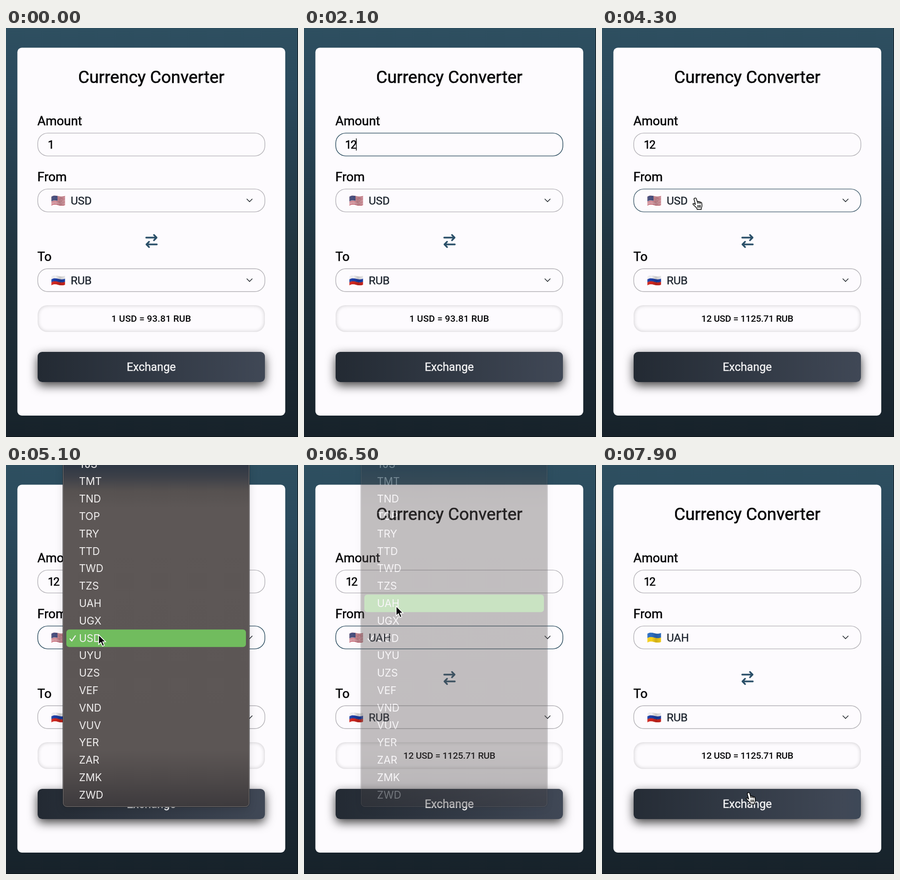
Animation, 600 px wide and 841 px high, one loop 8 s. Source, as an HTML page:

```html
<!DOCTYPE html>
<html lang="en">
<head>
<meta charset="utf-8">
<title>Currency Converter</title>
<style>
html, body { margin: 0; width: 100%; height: 100%; overflow: hidden; background: #17222a; }
#stage { position: relative; width: 600px; height: 841px; overflow: hidden;
  background: linear-gradient(#2e4f60, #2a4a5d 14%, #20343f 55%, #17222a); }
#stage::after { content: ""; position: absolute; inset: 0; border: solid #0c1216; border-width: 0 1px 1px 0; }
#stage div, #stage svg { position: absolute; box-sizing: border-box; }
#stage svg { left: 0; top: 0; width: 600px; height: 841px; overflow: visible; }
.field { fill: none; stroke-width: 1.4px; }
#result { left: 65px; top: 570px; width: 467px; height: 55px; border-radius: 20px;
  box-shadow: inset 0 0 9px rgba(0, 0, 0, .2); }
#button { left: 65px; top: 666px; width: 467px; height: 62px; border-radius: 9px;
  background: linear-gradient(90deg, #232a33, #404856 50%, #1d4c68) 0 0 / 200% 100%;
  box-shadow: 0 7px 20px rgba(0, 0, 0, .75); }
text { font-family: Roboto, "Open Sans", sans-serif; fill: #050507; }
.thick { stroke: #050507; stroke-width: .6px; }
.label { font-size: 26px; }
.value { font-size: 23px; letter-spacing: -1.6px; }
.code { font-size: 22.8px; fill: #1f2630; stroke: #1f2630; stroke-width: .45px; }
#rate { font-size: 19px; font-weight: 500; text-anchor: middle; }
#label { font-size: 23.4px; text-anchor: middle; fill: #f4f4f5; stroke: #f4f4f5; stroke-width: .4px; }
#menu { left: 117px; top: -20px; width: 383px; height: 723px; border-radius: 0 0 8px 8px; overflow: hidden;
  border: 1px solid #787473; box-shadow: 0 0 0 1px rgba(20, 20, 24, .55), 0 6px 18px rgba(0, 0, 0, .12);
  background: linear-gradient(#2d3744 2.5%, #3d4048 6%, #565150 10%, #5d5756 15%, #5c5655 84%, #504b4b 91%, #3d3a3d); }
#menu text { font: 21.3px Inter, sans-serif; fill: #f1efef; }
</style>
</head>
<body>
<div id="stage">
  <svg>
    <rect x="23.4" y="40.5" width="550.4" height="756.4" rx="9" fill="#fdfbfe"/>
    <rect class="field" id="amount" x="65.3" y="216.1" width="466.6" height="47" rx="20.5"/>
    <rect class="field" id="from" x="65.3" y="331.1" width="466.6" height="47" rx="20.5"/>
    <rect class="field" id="to" x="65.3" y="495" width="466.6" height="47" rx="20.5"/>
  </svg>
  <div id="result"></div>
  <div id="button"></div>
  <svg>
    <defs>
      <clipPath id="cloth"><path d="M0 2.6c5-3 9-2.5 14-1s10 1.5 14-.5v18.2c-4 2-9 2-14 .5s-9-2-14 1z"/></clipPath>
      <linearGradient id="fold">
        <stop offset="0" stop-color="#fff" stop-opacity=".08"/>
        <stop offset=".3" stop-opacity="0"/>
        <stop offset=".62" stop-opacity=".17"/>
        <stop offset="1" stop-opacity=".04"/>
      </linearGradient>
    </defs>
    <text class="thick" x="298.5" y="113" font-size="35.2" text-anchor="middle">Currency Converter</text>
    <text class="label thick" x="64.5" y="200">Amount</text>
    <text class="label thick" x="64.5" y="314.5">From</text>
    <text class="label thick" x="64.5" y="478.5">To</text>
    <text class="value thick" id="value" y="247.5"></text>
    <path id="caret" d="M107.5 227v25" stroke="#000" stroke-width="1.4"/>
    <text class="code" id="fromCode" x="133" y="362.5"></text>
    <text class="code" x="133" y="526.5">RUB</text>
    <g id="flags"></g>
    <g fill="none" stroke="#22272d" stroke-width="1.5" stroke-linecap="round" stroke-linejoin="round">
      <path d="M495 351.8l5.4 5.4 5.4-5.4"/>
      <path d="M495 515.8l5.4 5.4 5.4-5.4"/>
    </g>
    <g fill="none" stroke="#2b5069" stroke-width="3.3" stroke-linecap="round" stroke-linejoin="round">
      <path d="M288 431h21.5m-5.5-5.5l5.5 5.5-5.5 5.5"/>
      <path d="M310 445h-21.5m5.5-5.5l-5.5 5.5 5.5 5.5"/>
    </g>
    <text id="rate" x="298.5" y="603.5"></text>
    <text id="label" x="298.5" y="705">Exchange</text>
  </svg>
  <div id="menu">
    <svg viewBox="118 -19 600 841">
      <rect id="mark" x="124" width="369" height="36" rx="6" fill="#71bc5e"/>
      <path d="M131.5 357.5l3.6 4.3 7.4-10.6" fill="none" stroke="#f1efef" stroke-width="2.2" stroke-linecap="round" stroke-linejoin="round"/>
      <g id="rows"></g>
    </svg>
  </div>
  <svg id="cursor">
    <path id="arrow" transform="translate(-.6 -.4) scale(1.08)" d="M0 0V18.5L4.3 14.6 7.3 21.6 10.6 20.2 7.7 13.4H13.2Z" fill="#000" stroke="#fff" stroke-width="1.4"/>
    <g id="hand" transform="translate(-5 -1)" fill="#fff" stroke="#000" stroke-width="1.4" stroke-linejoin="round" stroke-linecap="round">
      <path d="M4.5 1.5C6 .5 7.5 1 8 2.8L9.8 8.6c.8-1 2.6-.9 3 .5 1-.8 2.6-.4 2.9.8 1.2-.5 2.8 0 3.2 1.6.6 2.5 1 5.5.3 7.7L18 21.5V24.5H9.5L8.8 22C6.5 19.5 4 17 1 14.2.2 13 1.8 11.7 3.2 12.6L6 14.5 3.2 4.2C2.8 2.9 3.3 1.9 4.5 1.5Z"/>
      <path d="M9.8 8.6l1 3.4M12.8 9.1l.8 3M15.7 9.9l.6 2.6M10.8 16v4.6M13.5 16v4.6M16 15.8v4.6" fill="none"/>
    </g>
    <path id="beam" d="M-3.5-12q3 0 3.5 2 .5-2 3.5-2M0-10V10M-3.5 12q3 0 3.5-2 .5 2 3.5 2" fill="none" stroke="#222" stroke-width="1.4"/>
  </svg>
</div>
<script>
const LOOP = 8000;
const ROW_H = 35.8, ROW_0 = -2.3;
const codes = "TJS TMT TND TOP TRY TTD TWD TZS UAH UGX USD UYU UZS VEF VND VUV YER ZAR ZMK ZWD".split(" ");

// pointer stops: time, x, y
const stops = [
  [300, 562, 420], [1100, 150, 242], [2400, 150, 242], [3000, 318, 687],
  [3650, 318, 687], [4250, 191, 349.5], [5400, 191, 349.5], [6000, 190, 290.5],
  [7250, 190, 290.5], [8000, 306, 692.7]
];
const at = {
  focus: 1300, type: 1700, pointer: 2400, click: 3300, rate: 3700,
  open: 4850, pick: 6300, close: 6400, closed: 6560, blur: 7000, flag: 7500
};
const areas = { amount: [216, 263], from: [331, 378], to: [495, 542], button: [666, 728] };

const $ = id => document.getElementById(id);
const between = (t, a, b) => t >= a && t < b;
const show = (id, on) => { $(id).style.visibility = on ? "visible" : "hidden"; };
const mix = (a, b, k) => `rgb(${a.map((v, i) => Math.round(v + (b[i] - v) * k))})`;

function wavy(bands) {
  return bands.map(([y, h, color, w = 28]) =>
    `<path d="M0 ${y + 2.6}c5-3 9-2.5 14-1s10 1.5 14-.5v${h}c-4 2-9 2-14 .5s-9-2-14 1z" fill="${color}"
      ${w < 28 ? 'style="clip-path:inset(0 ' + (28 - w) + 'px 0 0)"' : ""}/>`).join("");
}

function flag(id, y, bands, extra = "") {
  return `<g id="${id}" transform="translate(93.1 ${y}) scale(1.02)"><g clip-path="url(#cloth)">${wavy(bands)}${extra}
    <rect width="28" height="23" fill="url(#fold)"/></g></g>`;
}

function build() {
  const stripes = Array.from({ length: 13 }, (_, i) => [i * 1.4, 1.6, i % 2 ? "#f0eaec" : "#b52f42"]);
  stripes.push([0, 9.8, "#3a4274", 12.5]);
  let stars = "";
  for (let i = 0; i < 20; i++)
    stars += `<circle cx="${1.5 + i % 5 * 2.4}" cy="${3 + Math.floor(i / 5) * 2.3 - i % 5 * .35}" r=".45" fill="#dfe1ee"/>`;
  $("flags").innerHTML =
    flag("usFlag", 344, stripes, stars) +
    flag("uaFlag", 344, [[0, 9.4, "#2d6fc4"], [9.2, 9.4, "#f9d21c"]]) +
    flag("ruFlag", 508, [[0, 6.3, "#f1f0f2"], [6.1, 6.3, "#1c3fa8"], [12.2, 6.5, "#d0261f"]]);
  $("rows").innerHTML = codes.map((c, i) =>
    `<text x="150" y="${ROW_0 + i * ROW_H + 7.9}">${c}</text>`).join("");
}

function pointer(t) {
  let p = stops[0];
  for (const q of stops) {
    if (t < q[0]) {
      const k = Math.max(0, (t - p[0]) / (q[0] - p[0] || 1));
      const e = k * k * (3 - 2 * k);
      return [p[1] + (q[1] - p[1]) * e, p[2] + (q[2] - p[2]) * e];
    }
    p = q;
  }
  return [p[1], p[2]];
}

const visible = t => t >= 300 && !between(t, 1600, at.pointer);

function over(name, t) {
  if (!visible(t) || between(t, at.open, at.closed)) return false;
  const [x, y] = pointer(t), [top, bottom] = areas[name];
  return x > 65 && x < 532 && y >= top && y <= bottom;
}

const focused = (name, t) =>
  name === "amount" ? between(t, at.focus, at.click) :
  name === "from" && between(t, at.open, at.blur);

// share of the last span ms in which the test held: a linear transition
function eased(test, t, span) {
  let n = 0;
  for (let i = 0; i < 40; i++) n += test(t - (i + .5) * span / 40);
  return n / 40;
}

function draw(t) {
  const [x, y] = pointer(t);
  for (const name of ["amount", "from", "to"]) {
    const k = eased(s => over(name, s) || focused(name, s), t, 200);
    $(name).style.stroke = mix([181, 179, 184], [44, 77, 96], k);
  }
  $("button").style.backgroundPositionX = eased(s => over("button", s), t, 280) * 100 + "%";

  const editing = focused("amount", t), typed = t >= at.type;
  $("value").textContent = typed ? "12" : "1";
  $("value").setAttribute("x", editing ? 84.5 : 86);
  $("caret").setAttribute("transform", `translate(${typed ? 0 : -11} 0)`);
  show("caret", editing && (t - (typed ? at.type : at.focus)) % 1000 < 500);

  const done = t >= at.rate;
  $("rate").textContent = done ? "12 USD = 1125.71 RUB" : "1 USD = 93.81 RUB";
  $("rate").style.letterSpacing = done ? "-.25px" : ".15px";
  $("fromCode").textContent = t >= at.close ? "UAH" : "USD";
  show("usFlag", t < at.flag);
  show("uaFlag", t >= at.flag);

  const open = between(t, at.open, at.closed);
  $("menu").style.display = open ? "block" : "none";
  $("menu").style.opacity = t < at.close ? 1 : Math.max(0, 1 - (t - at.close) / (at.closed - at.close));
  const row = Math.round((y - ROW_0) / ROW_H);
  $("mark").setAttribute("y", ROW_0 + row * ROW_H - 17.5);
  show("mark", !between(t, at.pick + 20, at.pick + 80));

  const seen = visible(t);
  const swap = Math.abs(x - 299) < 14 && Math.abs(y - 438) < 15;
  const beam = over("amount", t);
  const hand = !open && (swap || ["from", "to", "button"].some(n => over(n, t)));
  $("cursor").style.transform = `translate(${x}px, ${y}px)`;
  show("beam", seen && beam);
  show("hand", seen && hand);
  show("arrow", seen && !beam && !hand);
}

build();
const start = performance.now();
function tick() {
  draw((performance.now() - start) % LOOP);
  requestAnimationFrame(tick);
}
tick();
</script>
</body>
</html>
```
